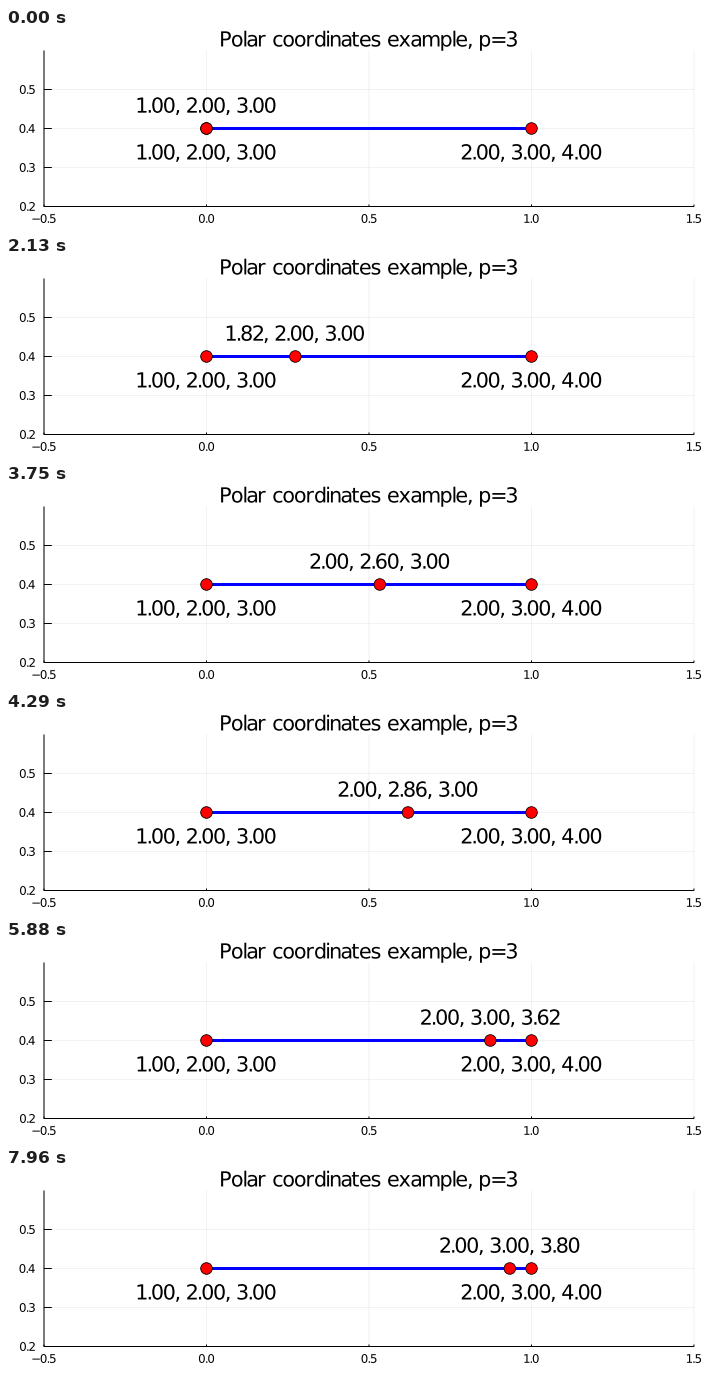
A matplotlib script that plays this animation: 700 by 200 pixels, repeating every 8 s.

```python
from functools import lru_cache

import matplotlib.pyplot as plt
import numpy as np
from matplotlib.animation import FuncAnimation
from matplotlib.patches import Circle, PathPatch
from matplotlib.path import Path
from matplotlib.textpath import TextPath

W, H, DPI = 700, 200, 100
STEP, LOOP = 20, 8000
PX = 72 / DPI
FONT = {"family": "DejaVu Sans"}
CAP, SPACE = 0.729, 0.318
BIG, SMALL = 14 * 1.08 / CAP, 8 * 1.08 / CAP

fig = plt.figure(figsize=(W / DPI, H / DPI), dpi=DPI, facecolor="white")
ax = fig.add_axes([0, 0, 1, 1])
ax.set(xlim=(0, W), ylim=(H, 0))
ax.axis("off")


def px(x):
    return 200.5 + 325 * x


def py(y):
    return 256.5 - 390 * y


@lru_cache(None)
def glyph(ch, size):
    return TextPath((0, 0), ch, size=size, prop=FONT)


def text_path(x, y, s, size, align=0.5):
    """Text whose glyphs advance by their right ink edge, capitals centred on y."""
    pen, parts = 0, []
    for ch in s:
        if ch == " ":
            pen += SPACE * size
            continue
        shape = glyph(ch, size)
        parts.append(Path(shape.vertices * [1, -1] + [pen, 0], shape.codes))
        pen += shape.get_extents().x1
    start = parts[0].get_extents().x0
    origin = [x - start - align * (pen - start), y + CAP * size / 2]
    whole = Path.make_compound_path(*parts)
    return Path(whole.vertices + origin, whole.codes)


def text(*args, **kw):
    path = text_path(*args, **kw)
    return ax.add_patch(PathPatch(path, fc="black", lw=0, zorder=5, snap=False))


def line(x, y, color="black", width=1.0, **kw):
    ax.plot(x, y, color=color, lw=width * PX, solid_capstyle="butt",
            solid_joinstyle="miter", snap=False, **kw)


def marker(x):
    dot = Circle((px(x), py(0.4)), 5.8, fc="red", ec="black", lw=0.8 * PX, zorder=4)
    return ax.add_patch(dot)


def label(values):
    return ", ".join(f"{v:.2f}" for v in values)


left, right, top, bottom = px(-0.5), px(1.5), py(0.6), py(0.2)
xticks = np.arange(-0.5, 1.6, 0.5)
yticks = np.arange(0.2, 0.55, 0.1)

for v in xticks:
    line([px(v)] * 2, [top, bottom], width=0.5, alpha=0.1)
    line([px(v)] * 2, [bottom, bottom - 2])
    text(px(v), 190.5, f"{v:.1f}".replace("-", "\u2212"), SMALL)
for v in yticks:
    line([left, right], [py(v)] * 2, width=0.5, alpha=0.1)
    line([left, left + 7.8], [py(v)] * 2)
    text(28.8, py(v), f"{v:.1f}", SMALL, align=1)
line([left, left, right], [top, bottom, bottom])

text(363, 10.9, "Polar coordinates example, p=3", BIG)
line([px(0), px(1)], [py(0.4)] * 2, "blue", 3, zorder=3)
start = np.array([1, 2, 3])
for end in (0, 1):
    marker(end)
    text(px(end), py(0.34), label(start + end), BIG)

dot = marker(0)
caption = text(px(0), py(0.46), label(start), BIG)


def travel(ms):
    """Distance covered, 0 to 3, in steps of 0.02 at 24 per second."""
    n = int((ms + 4) * 24 / 1000)
    return 0.02 * (min(max(n - 10, 0), 150) - max(n - 181, 0))


def draw(i):
    s = travel(i * STEP + STEP / 2)
    x = s / 3
    dot.center = px(x), py(0.4)
    values = start + np.clip(s - np.arange(3), 0, 1)
    caption.set_path(text_path(px(x), py(0.46), label(values), BIG))
    return dot, caption


anim = FuncAnimation(fig, draw, frames=LOOP // STEP, interval=STEP, init_func=lambda: draw(0),
                     repeat=True, repeat_delay=0)
plt.show()
```
